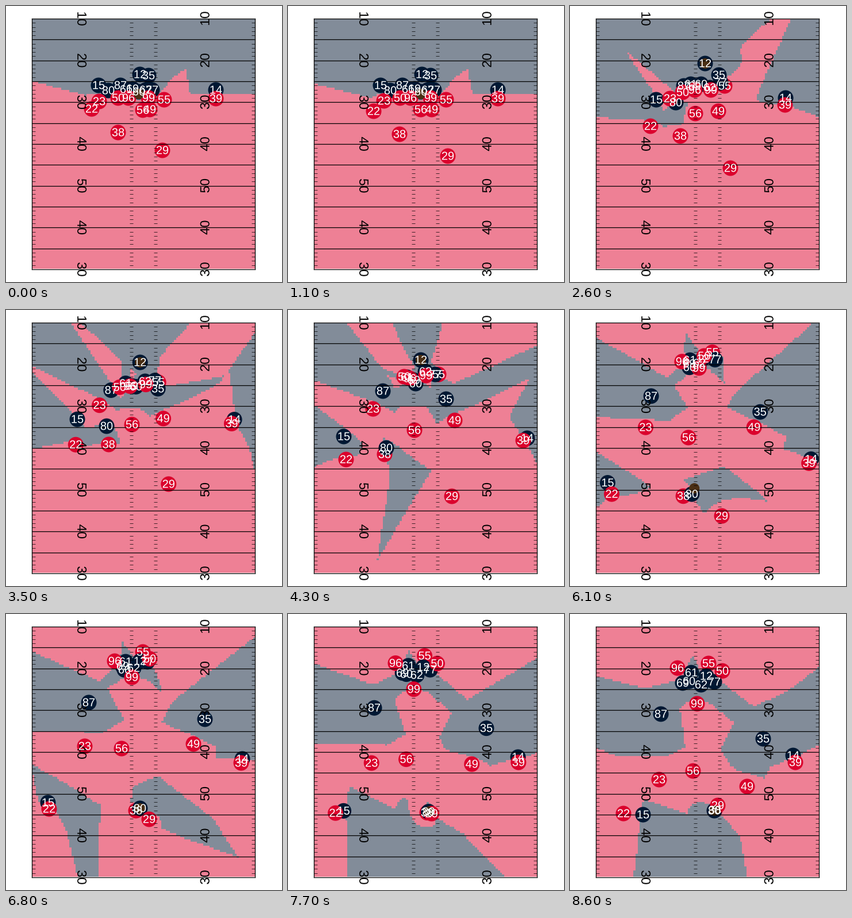
Animation of 480x480 px, one loop 8.7 s. Source, as a matplotlib script:

```python
import numpy as np
import matplotlib.pyplot as plt
from matplotlib.animation import FuncAnimation
from matplotlib.patches import Circle, PathPatch
from matplotlib.path import Path
from matplotlib.textpath import TextPath

FRAMES, STEP = 87, 100
NAVY, RED, BROWN = "#001833", "#DB022D", "#4A2F14"
SHADES = np.array([[238, 128, 149], [130, 140, 153]], np.uint8)
LEFT, RIGHT, TOP, BOTTOM = 44.9, 432.9, 22, 458
YARD = (BOTTOM - TOP) / 60
TOP_SPEED, DRAG = 6.3, 0.12           # pixels per frame, per frame
SNAP, HELD, THROW, CATCH = 13, 19, 44, 62

# Key poses of every player, from just before the snap to the end.
KEYS = np.array([0, 11, 26, 43, 53, 68, 86])
HOME = {
    61: [(209, 145), (210, 136), (207, 117), (209, 98), (208, 83), (211, 102)],
    69: [(220, 144), (217, 139), (219, 122), (213, 103), (203, 91), (196, 120)],
    60: [(231, 149), (228, 136), (222, 128), (212, 109), (206, 97), (207, 117)],
    62: [(243, 146), (243, 142), (239, 107), (231, 96), (222, 94), (228, 123)],
    77: [(254, 146), (262, 133), (256, 112), (259, 97), (246, 83), (251, 118)],
    87: [(199, 138), (198, 139), (165, 141), (144, 146), (144, 154), (158, 174)],
    12: [(233, 119), (235, 100), (231, 87), (229, 90), (233, 82), (237, 108)],
    35: [(248, 121), (259, 120), (275, 155), (306, 171), (346, 183), (336, 217)],
    15: [(161, 138), (150, 163), (97, 220), (69, 263), (73, 328), (127, 349)],
    80: [(178, 147), (184, 168), (171, 240), (187, 290), (233, 338), (251, 342)],
    14: [(365, 146), (375, 160), (416, 223), (424, 259), (411, 252), (388, 246)],
}
AWAY = {
    38: [(194, 223), (192, 226), (168, 251), (168, 294), (226, 342), (252, 341)],
    55: [(275, 163), (269, 139), (262, 112), (259, 89), (238, 66), (241, 86)],
    50: [(195, 160), (196, 150), (202, 116), (214, 90), (250, 78), (265, 99)],
    96: [(213, 160), (217, 146), (212, 119), (203, 103), (189, 82), (187, 94)],
    99: [(248, 160), (245, 146), (240, 114), (232, 99), (219, 110), (221, 156)],
    23: [(167, 165), (174, 161), (148, 172), (131, 180), (137, 230), (155, 288)],
    22: [(149, 183), (140, 209), (101, 260), (77, 293), (75, 339), (93, 347)],
    56: [(231, 180), (218, 187), (220, 209), (214, 212), (201, 234), (214, 273)],
    49: [(250, 180), (258, 183), (290, 192), (308, 188), (326, 226), (308, 300)],
    29: [(278, 261), (279, 282), (285, 324), (282, 351), (249, 357), (257, 333)],
    39: [(365, 161), (374, 172), (409, 227), (419, 266), (409, 259), (392, 258)],
}
# Shift of the few defenders who creep about before the snap.
CREEP = {29: (-6, -10), 23: (-5, 1), 56: (7, 1), 22: (0, -4), 38: (1, -3)}


def run(number, poses):
    """Smooth path through the key poses, one point per frame."""
    v = np.array(poses, float)
    v = np.vstack([v[0] + CREEP.get(number, (0, 0)), v])
    h = np.diff(KEYS)[:, None]
    s = np.diff(v, axis=0) / h
    bend = (h[1:] * s[:-1] + h[:-1] * s[1:]) / (h[1:] + h[:-1])
    m = np.vstack([s[:1], bend, s[-1:]])
    m[1] = s[0]                       # steady until the snap
    t = np.arange(FRAMES)
    k = np.clip(np.searchsorted(KEYS, t, "right") - 1, 0, len(h) - 1)
    g = h[k]
    u = (t[:, None] - KEYS[k][:, None]) / g
    return ((1 + 2 * u) * (1 - u) ** 2 * v[k] + u * (1 - u) ** 2 * g * m[k]
            + u * u * (3 - 2 * u) * v[k + 1] + u * u * (u - 1) * g * m[k + 1])


def ball_path(runs):
    """Snapped by 60, thrown by 12, caught by 80."""
    path = np.where(np.arange(FRAMES)[:, None] < SNAP, runs[60] + [0, 4], runs[12])
    path[CATCH:] = runs[80][CATCH:]
    for start, end in ((SNAP, HELD), (THROW, CATCH)):
        w = np.linspace(0, 1, end - start + 1)[:, None]
        path[start:end + 1] = (1 - w) * path[start - 1] + w * path[end]
    return path


home = {n: run(n, p) for n, p in HOME.items()}
away = {n: run(n, p) for n, p in AWAY.items()}
ball_track = ball_path(home)

cols, rows = 107, 120
gx = LEFT + (np.arange(cols) + 0.5) * (RIGHT - LEFT) / cols
gy = TOP + (np.arange(rows) + 0.5) * (BOTTOM - TOP) / rows
GX, GY = (a.ravel().astype(np.float32) for a in np.meshgrid(gx, gy))


def motion(team):
    pos = np.array(list(team.values()))
    return np.concatenate([pos, np.gradient(pos, axis=1)], axis=2).astype(np.float32)


MOTION = motion(home), motion(away)


def arrival(team, i):
    """Earliest time any of a team can reach each cell, given its momentum."""
    x, y, vx, vy = team[:, i].T[:, :, None]
    dx, dy = GX - x, GY - y
    t = np.hypot(dx, dy) / TOP_SPEED + 4
    for _ in range(4):
        glide = (1 - np.exp(-DRAG * t)) / DRAG
        t = glide + np.hypot(dx - vx * glide, dy - vy * glide) / TOP_SPEED
    return t.min(axis=0)


def territory(i):
    ours, theirs = (arrival(team, i) for team in MOTION)
    return SHADES[(ours < theirs).astype(int)].reshape(rows, cols, 3)


def glyphs(text, size, turn=0):
    """Outline of a two-digit label centred on the start point, y pointing down."""
    p = TextPath((0, 0), text, size=size, prop={"family": "Liberation Sans"})
    u, v = (p.vertices - [0.556 * size, 0.345 * size]).T
    x, y = {0: (u, -v), 90: (-v, -u), 270: (v, u)}[turn]
    return np.column_stack([x, y]), p.codes


fig = plt.figure(figsize=(4.8, 4.8), dpi=100, facecolor="white")
ax = fig.add_axes([0, 0, 1, 1])
ax.axis("off")
image = ax.imshow(territory(0), extent=(LEFT, RIGHT + 0.6, BOTTOM - 1, TOP + 1.5),
                  interpolation="nearest", aspect="auto", zorder=1)
ax.set(xlim=(0, 480), ylim=(480, 0))

for n in range(61):
    y = TOP + n * YARD
    if n % 5 == 0:
        ax.plot([LEFT, RIGHT], [y, y], color="black", lw=0.9, zorder=6)
    else:
        for x in (LEFT, 215, 257, RIGHT - 6):
            ax.plot([x, x + 6], [y, y], color="black", alpha=0.75, lw=0.7,
                    solid_capstyle="butt", zorder=6)
for x in (LEFT, RIGHT):
    ax.plot([x, x], [TOP, BOTTOM], color="black", lw=0.9, zorder=6)

for n in range(7):
    mark = 50 - 10 * abs(4 - n)
    for x, turn in ((LEFT + 12 * YARD, 270), (RIGHT - 12 * YARD, 90)):
        verts, codes = glyphs(str(mark), 22.8, turn)
        ax.add_patch(PathPatch(Path(verts + [x, TOP + 10 * n * YARD], codes),
                               fc="black", lw=0, zorder=7))


def dot(radius, color, z):
    return ax.add_patch(Circle((0, 0), radius, fc=color, lw=0, zorder=z))


players = []
for team, color in ((home, NAVY), (away, RED)):
    for number, track in team.items():
        layer = 3 if color == NAVY else 2 if number in (38, 55) else 4
        verts, codes = glyphs(str(number), 20)
        label = ax.add_patch(PathPatch(Path(verts, codes), fc="white", lw=0, zorder=8))
        players.append((track, dot(13.5, color, layer), label, verts, codes))
ball = dot(9, BROWN, 5)


def update(i):
    image.set_data(territory(i))
    for track, disc, label, verts, codes in players:
        disc.center = track[i]
        label.set_path(Path(verts + track[i] - [0, 0.5], codes))
    ball.center = ball_track[i]
    return []


anim = FuncAnimation(fig, update, frames=FRAMES, interval=STEP, repeat=True,
                     init_func=lambda: update(0))
plt.show()
```
